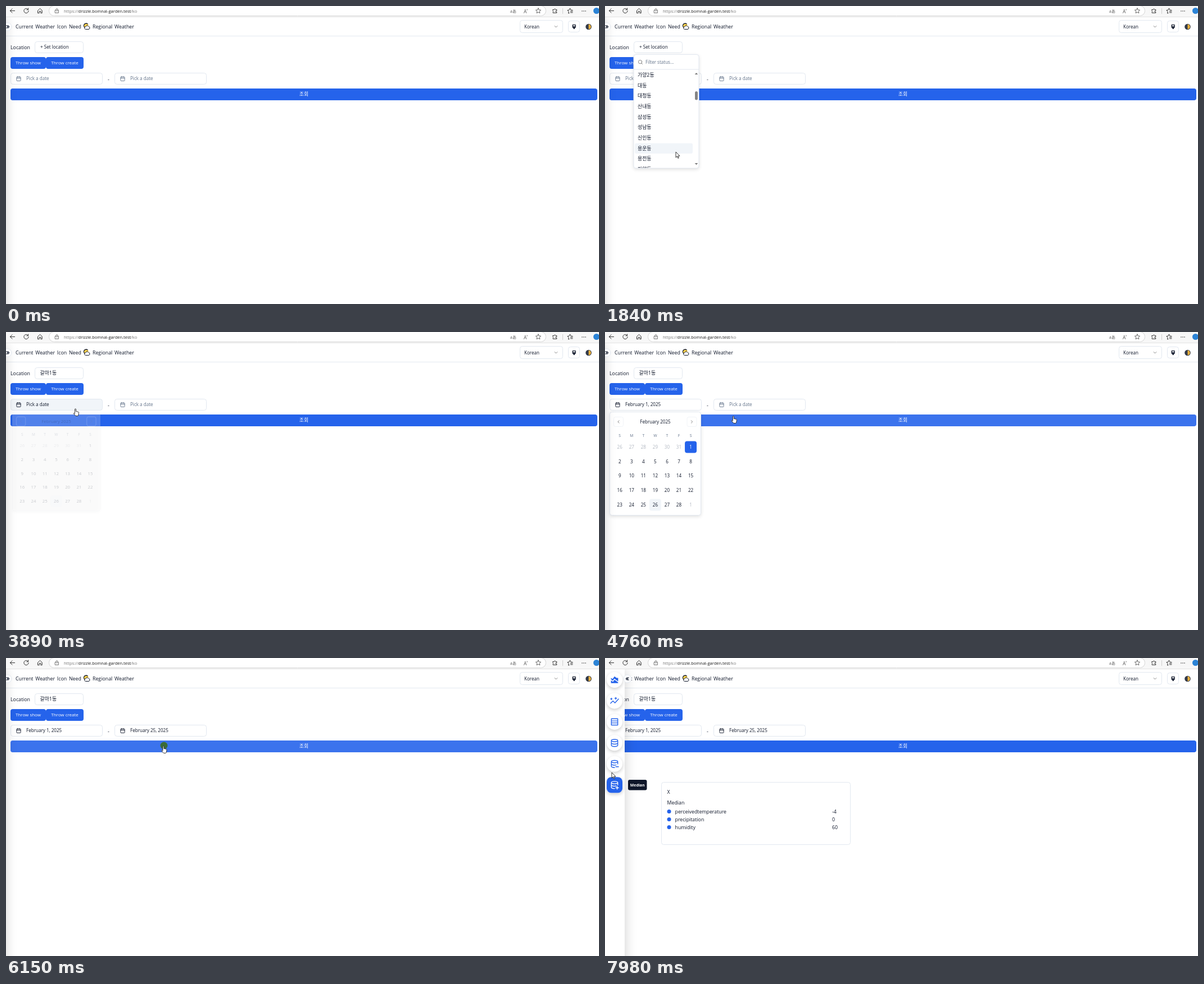
Recreate the animation shown at these times as an HTML page with a canvas. Size 1055x531 px, loop 8000 ms.

```html
<!DOCTYPE html>
<html lang="en">
<head>
<meta charset="utf-8">
<title>Regional weather</title>
<style>
html, body { margin: 0; width: 100%; height: 100%; overflow: hidden; background: #fff; }
canvas { display: block; }
</style>
</head>
<body>
<canvas id="stage" width="1055" height="531"></canvas>
<script>
const g = document.getElementById('stage').getContext('2d');
const LOOP = 8000, FADE = 150, ROW = 18.67;
const INK = '#0f172a', MUTED = '#64748b', LINE = '#e2e8f0', ACCENT = '#f1f5f9', BLUE = '#2563eb';
const FONT = '"Open Sans", "Noto Sans CJK KR", "Noto Sans CJK", sans-serif';

// Icons on a 24 unit grid
const DB_TOP = 'M20 6c0 1.7-3.6 3-8 3S4 7.7 4 6s3.6-3 8-3 8 1.3 8 3z';
const DB_PART = DB_TOP + 'M20 6v6M4 6v12c0 1.7 3.6 3 8 3M4 12c0 1.7 3.6 3 8 3 2 0 3-.2 4-.5M15 19h7';
const ICON = {
  back: 'M21 12H3m8-8-8 8 8 8',
  reload: 'M21 12a9 9 0 1 1-3-6.7M20 2v6h-6',
  home: 'M4 10.5 12 3l8 7.5V21h-5v-7H9v7H4z',
  lock: 'M5 10h14v11H5zM8 10V7a4 4 0 0 1 8 0v3M12 15v1',
  star: 'm12 2 3 6.5 7 .8-5.2 4.8 1.4 7L12 17.6 5.800 21.100l1.400-7L2 9.300l7-.8z',
  favorites: 'm9 21-3.500 1 1.300-7L2 10l6.500-1L12 2l3 7 7 .8M14 14h8M14 19h8',
  puzzle: 'M4 7h5a3 3 0 1 1 6 0h5v5a3 3 0 1 0 0 5v4H4v-4a3 3 0 0 0 0-5z',
  down: 'm5 9 7 7 7-7',
  left: 'm15 6-6 6 6 6',
  right: 'm9 6 6 6-6 6',
  lefts: 'm18 5-7 7 7 7M11 5l-7 7 7 7',
  rights: 'm6 5 7 7-7 7M13 5l7 7-7 7',
  calendar: 'M5 4h14q2 0 2 2v14q0 2-2 2H5q-2 0-2-2V6q0-2 2-2zM16 2v4M8 2v4M3 10h18',
  search: 'M19 11a8 8 0 1 1-16 0 8 8 0 1 1 16 0M21 21l-4.300-4.300',
  brush: 'M6 3h13v9H6zM6 12v3h5v6h3v-6h5v-3',
  area: 'M3 13v7h18v-1.500l-9-7L8 17zM3 7l4 3 5-7 5 4h4v9l-9.400-7.300-4 5.500L3 10.400z',
  insights: 'M2 18l6-6 5 5 9-10M15 3v5M12.500 5.500h5M4 5v4M2 7h4',
  rows: 'M4 4h16v16H4zM4 9.500h16M4 14.500h16',
  db: DB_TOP + 'M4 6v12c0 1.700 3.600 3 8 3s8-1.300 8-3V6M4 12c0 1.700 3.600 3 8 3s8-1.300 8-3',
  dbMinus: DB_PART,
  dbPlus: DB_PART + 'M18.500 15.500v7'
};
const ARROW = new Path2D('M0 0V10l2.300-2.200 1.600 3.600 1.500-.7-1.600-3.500H7z');
const HAND = new Path2D('M-1 6.500V.8a1 1 0 0 1 2 0V4.500l4 .8q1.200.3 1 1.600l-.7 4q-.2 1.600-1.600 1.600H.6L-3.400 8.200q.8-1.400 2.400 0z');

const DISTRICTS = ('대화 덕암 목상 법1 법2 비래 석봉 송촌 신탄진 오정 중리 회덕 ' +
  '가양1 가양2 대 대청 산내 삼성 성남 신인 용운 용전 자양 중앙 판암1 판암2 홍도 효 ' +
  '가수원 가장 갈마1 갈마2 관저1 관저2 괴정 기성 내 도마1 도마2 도안 둔산1 둔산2 둔산3')
  .split(' ').map(name => name + '동');

// Pointer keys: time, x, y, hand shape
const POINTER = [
  [50, 985, 497, 0], [650, 104, 73, 1], [1000, 104, 73, 1], [1300, 126, 256, 0], [1840, 126, 260, 0],
  [2300, 134.5, 258, 0], [2780, 134.5, 258, 0], [3150, 118, 141, 0], [3430, 118, 141, 0],
  [3700, 123.5, 137, 1], [4140, 123.5, 137, 1], [4420, 150, 206, 1], [4600, 150, 206, 1],
  [4840, 255, 131, 1], [5050, 255, 131, 1], [5420, 252, 310, 1], [5610, 252, 310, 1],
  [5780, 255, 385, 0], [5850, 255, 385, 0], [6100, 280, 157, 1], [6250, 280, 157, 1],
  [6540, 6, 36, 1], [6690, 6, 36, 1], [7010, 50.5, 195.5, 0], [7330, 17, 226, 1],
  [7900, 17, 226, 1], [7970, 12, 204, 0]
];
const SCROLL = [[1250, 0], [1800, 244.7], [1950, 244.7], [2620, 578.7], [2780, 578.7], [3100, 545]];
const SELECTED = [[0, 0], [1330, 9], [1700, 20], [2350, 31], [3050, 30]];
const CLICKS = [760, 3380, 3740, 4500, 4880, 5540, 6140, 6570, 7340];

const PANELS = {
  place: { x: 51, y: 86.5, w: 116, h: 202.5, open: 860, close: 3400 },
  from: { x: 8.5, y: 142.5, w: 162, h: 184, open: 3860, close: 4900 },
  to: { x: 194.5, y: 142.5, w: 162, h: 184, open: 5000, close: 5690 }
};

let now = 0, mouse = { x: 0, y: 0, hand: 0 };

const clamp = v => Math.max(0, Math.min(1, v));
const smooth = p => p * p * (3 - 2 * p);
const inside = (x, y, w, h) => now >= 50 && mouse.x >= x && mouse.x <= x + w && mouse.y >= y && mouse.y <= y + h;
const lastKey = keys => keys.filter(k => k[0] <= now).pop() || keys[0];

function track(keys, col) {
  const i = keys.findIndex(k => k[0] > now);
  if (i < 1) return keys[i ? keys.length - 1 : 0][col];
  const a = keys[i - 1], b = keys[i];
  return a[col] + (b[col] - a[col]) * smooth((now - a[0]) / (b[0] - a[0]));
}

const visibility = p => clamp((now - p.open) / FADE) * (1 - clamp((now - p.close) / FADE));
const covered = () => Object.values(PANELS).some(p => visibility(p) > 0 && inside(p.x, p.y, p.w, p.h));

function box(x, y, w, h, r, fill, stroke) {
  g.beginPath();
  g.roundRect(x, y, w, h, r);
  if (fill) { g.fillStyle = fill; g.fill(); }
  if (stroke) { g.strokeStyle = stroke; g.lineWidth = 1; g.stroke(); }
}

function dot(x, y, r, fill) {
  g.beginPath();
  g.arc(x, y, r, 0, 7);
  g.fillStyle = fill;
  g.fill();
}

// y is the middle of the capitals
function text(str, x, y, color = INK, size = 8.1, align = 'left', weight = 400) {
  g.font = `${weight} ${size}px ${FONT}`;
  g.textAlign = align;
  g.fillStyle = color;
  g.fillText(str, x, y + size * 0.36);
  return x + g.measureText(str).width;
}

function icon(name, x, y, size, color = '#333', width = 1, filled = false) {
  const k = size / 24, path = new Path2D(ICON[name]);
  g.save();
  g.translate(x - size / 2, y - size / 2);
  g.scale(k, k);
  g.lineWidth = width / k;
  g.lineCap = g.lineJoin = 'round';
  g.fillStyle = g.strokeStyle = color;
  if (filled) g.fill(path); else g.stroke(path);
  g.restore();
}

function shadowed(color, blur, dy, draw) {
  g.save();
  g.shadowColor = color;
  g.shadowBlur = blur;
  g.shadowOffsetY = dy;
  draw();
  g.restore();
}

function browserBar() {
  g.fillStyle = '#f7f7f7';
  g.fillRect(0, 0, 1055, 19);
  g.fillStyle = '#e3e3e3';
  g.fillRect(0, 19, 1055, 1);
  icon('back', 11.5, 8.5, 11);
  icon('reload', 36, 8.5, 11);
  icon('home', 60.5, 8.5, 11);
  box(76.5, -0.5, 884, 18, 9, '#fff', '#d6d6d6');
  icon('lock', 90.5, 8.5, 10, '#666', 0.9);
  let x = text('https://', 103, 9, '#777', 7.5);
  x = text('drizzle.bomnal-garden.test', x, 9, '#1b1b1b', 7.5);
  text('/ko', x, 9, '#777', 7.5);
  text('aあ', 897, 9, '#555', 7);
  text('A', 921, 9.5, '#555', 8.5);
  text('»', 926, 6, '#555', 5);
  icon('star', 947, 8.5, 11, '#555', 0.9);
  icon('puzzle', 976.5, 8.5, 10);
  g.fillStyle = '#d0d0d0';
  g.fillRect(990, 4, 1, 10);
  icon('favorites', 1003.5, 8.5, 11);
  [1025, 1028, 1031].forEach(x => dot(x, 9, 0.8, '#333'));
  dot(1050.5, 8.5, 5.5, '#2b83d6');
}

function weatherIcon() {
  dot(142.5, 35, 4, '#fcd34d');
  g.strokeStyle = INK;
  g.lineWidth = 1.3;
  g.beginPath();
  g.arc(142.5, 35, 4, 2.2, 5.6);
  g.stroke();
  const cloud = new Path2D('M141.500 41.500a2.300 2.300 0 0 1 0-4.500 3 3 0 0 1 5.500-.4 2.500 2.500 0 0 1 0 4.900z');
  g.fillStyle = '#fff';
  g.fill(cloud);
  g.lineWidth = 1;
  g.stroke(cloud);
}

function header() {
  g.fillStyle = LINE;
  g.fillRect(0, 53, 1055, 1);
  g.wordSpacing = '1.5px';
  text('Current Weather Icon Need', 17, 37, INK, 8.8);
  text('Regional Weather', 154, 37, INK, 8.8);
  g.wordSpacing = '0px';
  weatherIcon();
  box(914.5, 25.5, 76, 22, 4, '#fff', LINE);
  text('Korean', 922, 37);
  icon('down', 978.5, 36.5, 8, '#777', 0.9);
  box(1000.5, 26.5, 20, 20, 4, '#fff', LINE);
  icon('brush', 1010.5, 37, 9, INK, 1.3);
  dot(1036.5, 37, 5.3, '#333a4a');
  g.beginPath();
  g.arc(1036.5, 37, 4.4, -Math.PI / 2, Math.PI / 2);
  g.fillStyle = '#eab13c';
  g.fill();
}

function dateField(x, value) {
  const hot = inside(x, 119, 163, 21), color = hot || value ? INK : MUTED;
  box(x + 0.5, 119.5, 163, 20, 4, hot ? ACCENT : '#fff', LINE);
  icon('calendar', x + 14.5, 129.5, 9.5, color, 0.9);
  text(value || 'Pick a date', x + 28, 129.5, color);
}

function blueButton(label, x, y, w, size) {
  box(x, y, w, 21, 4, inside(x, y, w, 21) && !covered() ? '#3b73ed' : BLUE);
  text(label, x + w / 2, y + 10, '#fff', size, 'center', 500);
}

function form() {
  text('Location', 8, 73.5, INK, 8.8);
  box(51.5, 63.5, 86, 20, 4, inside(51, 63, 87, 21) ? ACCENT : '#fff', LINE);
  if (now < 3400) text('+ Set location', 61, 73.5); else text('갈마1동', 60.5, 73, INK, 8.9);
  blueButton('Throw show', 8, 91, 63, 8);
  blueButton('Throw create', 71, 91, 67, 8);
  dateField(8, now > 4520 && 'February 1, 2025');
  text('-', 182.5, 130.5, INK, 8.8, 'center');
  dateField(193, now > 5600 && 'February 25, 2025');
  blueButton('조회', 8, 147, 1044, 8.9);
}

function panel(p, body) {
  const a = visibility(p);
  if (!a) return;
  const cx = p.x + p.w / 2, cy = p.y + p.h / 2, k = 0.95 + 0.05 * a;
  g.save();
  g.globalAlpha = a;
  g.translate(cx, cy - 4.7 * (1 - a));
  g.scale(k, k);
  g.translate(-cx, -cy);
  shadowed('rgba(0,0,0,.14)', 6, 2, () => box(p.x, p.y, p.w, p.h, 4, '#fff'));
  box(p.x, p.y, p.w, p.h, 4, null, LINE);
  body(p);
  g.restore();
}

function triangle(x, y, h) {
  g.beginPath();
  g.moveTo(x - 2.8, y + h / 2);
  g.lineTo(x + 2.8, y + h / 2);
  g.lineTo(x, y - h / 2);
  g.fillStyle = '#777';
  g.fill();
}

function placeList() {
  icon('search', 63, 100, 9.5, '#777', 0.9);
  text('Filter status...', 72, 100, MUTED);
  if ((now + 760) % 1000 < 500) {
    g.fillStyle = '#111';
    g.fillRect(72, 94, 1, 11);
  }
  g.fillStyle = LINE;
  g.fillRect(51, 112.5, 116, 1);
  const top = track(SCROLL, 1), selected = lastKey(SELECTED)[1];
  g.save();
  g.beginPath();
  g.rect(51, 114, 116, 174.5);
  g.clip();
  DISTRICTS.forEach((name, i) => {
    const y = 125 + i * ROW - top;
    if (y < 100 || y > 300) return;
    if (i === selected) box(53, y - 9.3, 103, ROW, 3, ACCENT);
    text(name, 58, y - 0.3, INK, 8.9);
  });
  g.restore();
  triangle(162.5, 120.5, 3);
  triangle(162.5, 281.5, -3);
  box(160, 128.5 + top / 10.44, 5, 15.5, 2.5, '#858585');
}

function calendar(p, picked) {
  text('February 2025', p.x + p.w / 2, 160, INK, 8.1, 'center', 500);
  [['left', 15.5], ['right', 146]].forEach(([name, dx]) => {
    box(p.x + dx - 8.5, 151.5, 17, 17, 3, null, '#f1f4f8');
    icon(name, p.x + dx, 160, 9, '#777', 0.9);
  });
  const colX = c => p.x + 17.7 + c * 21.06;
  [...'SMTWTFS'].forEach((d, c) => text(d, colX(c), 184.5, MUTED, 6.8, 'center'));
  for (let i = 0; i < 35; i++) {
    const x = colX(i % 7), y = 205 + Math.floor(i / 7) * 25.75;
    const inMonth = i > 5 && i < 34, day = i < 6 ? 26 + i : inMonth ? i - 5 : 1;
    const on = inMonth && day === picked;
    if (on || (inMonth && day === 26) || inside(x - 10.5, y - 10.5, 21, 21))
      box(x - 10.5, y - 10.5, 21, 21, 4, on ? BLUE : ACCENT);
    text(day, x, y, on ? '#fff' : inMonth ? INK : '#b1b7c1', 8.1, 'center');
  }
}

function card() {
  const a = clamp((now - 7390) / 60);
  if (!a) return;
  g.save();
  g.globalAlpha = a;
  box(100.5, 221.5, 336, 111, 4, '#fff', LINE);
  text('X', 110.5, 239, INK, 8.8);
  text('Median', 110.5, 258, INK, 8.8);
  [['perceivedtemperature', -4], ['precipitation', 0], ['humidity', 60]].forEach(([label, value], i) => {
    const y = 274 + i * 14;
    dot(114, y - 0.5, 3.5, BLUE);
    text(label, 124.5, y, INK, 8.8);
    text(value, 404, y, INK, 8.8);
  });
  box(41, 217, 33.500, 18.500, 3, INK);
  text('Median', 57.700, 226.300, '#fff', 6.900, 'center', 700);
  g.restore();
}

function sidebar() {
  const p = clamp((now - 6710) / 500), edge = -2 + 37 * (1 - (1 - p) ** 2);
  const hot = clamp((now - 7400) / 180);
  shadowed('rgba(0,0,0,.2)', 22, 0, () => {
    g.fillStyle = '#fff';
    g.fillRect(edge - 60, 20, 60, 530);
  });
  if (p) ['area', 'insights', 'rows', 'db', 'dbMinus', 'dbPlus'].forEach((name, i) => {
    const x = edge - 18, y = 39 + i * 37.45, h = i === 5 ? hot : 0;
    shadowed('rgba(0,0,0,.2)', 6, 2.5, () => box(x - 14, y - 14, 28, 28, 14 - 6 * h, '#fff'));
    if (h) {
      g.save();
      g.globalAlpha = h;
      box(x - 14, y - 14, 28, 28, 14 - 6 * h, BLUE);
      g.restore();
    }
    icon(name, x, y, 17, h > 0.5 ? '#fff' : BLUE, 1.4, name === 'area');
  });
  box(edge - 2, 30, 14, 14, 7, '#fff', LINE);
  icon(p === 0 ? 'rights' : p < 1 ? 'left' : 'lefts', edge + 5, 37, 8, INK, 1.1);
}

function pointer() {
  if (now < 50) return;
  if (CLICKS.some(c => now >= c && now < c + 120)) {
    g.save();
    g.globalCompositeOperation = 'multiply';
    dot(mouse.x + 1, mouse.y - 1, 6.5, '#f8f03c');
    g.restore();
  }
  g.save();
  g.translate(mouse.x, mouse.y);
  g.fillStyle = '#fff';
  g.strokeStyle = '#222';
  g.lineWidth = 0.9;
  const shape = mouse.hand ? HAND : ARROW;
  g.fill(shape);
  g.stroke(shape);
  g.restore();
}

function draw(time) {
  now = time % LOOP;
  mouse = { x: track(POINTER, 1), y: track(POINTER, 2), hand: lastKey(POINTER)[3] };
  g.fillStyle = '#fff';
  g.fillRect(0, 0, 1055, 531);
  header();
  form();
  card();
  panel(PANELS.place, placeList);
  panel(PANELS.from, p => calendar(p, now > 4520 ? 1 : 0));
  panel(PANELS.to, p => calendar(p, now > 5600 ? 25 : 0));
  sidebar();
  browserBar();
  pointer();
  requestAnimationFrame(draw);
}
requestAnimationFrame(draw);
</script>
</body>
</html>
```
